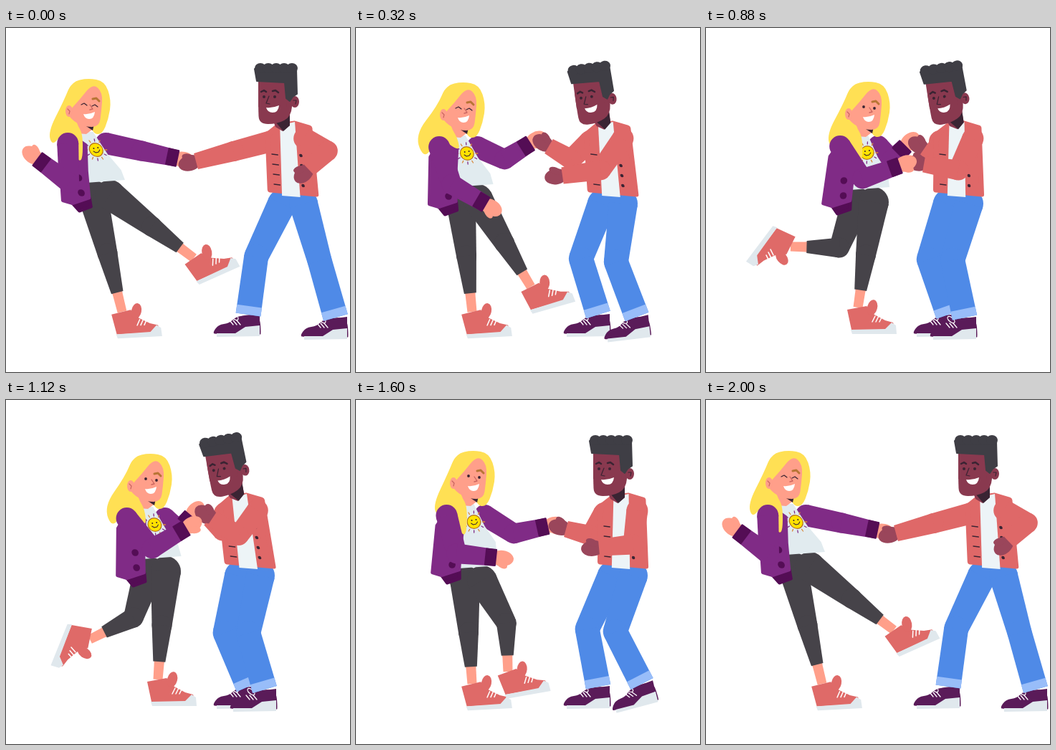
An HTML page with a canvas that plays this animation: 480x480 px, repeating every 2080 ms.

```html
<!DOCTYPE html>
<html lang="en">
<head>
<meta charset="utf-8">
<title>Dancing couple</title>
<style>
html, body { margin: 0; width: 100%; height: 100%; overflow: hidden; background: #fff; }
canvas { display: block; width: 480px; height: 480px; }
</style>
</head>
<body>
<canvas id="stage" width="480" height="480"></canvas>
<script>
const g = document.getElementById('stage').getContext('2d');
const LOOP = 2080, STEP = 80;
const BEATS = [0, 320, 560, 880, 1120, 1600, 1880];
const C = {
  blond: '#ffe054', peach: '#ff9f8a', purple: '#802b86', plum: '#540d55', pants: '#464349',
  shirt: '#e1ebef', boot: '#df6a68', sole: '#e0e8ed', brown: '#89394f', palm: '#9a465b', black: '#3f3e45',
  coral: '#df6868', jeans: '#4f8ae7', cuff: '#98bdf9', shoe: '#5a1b59', ink: '#3a2433'
};

// One key per beat; elbows, knees, torsos and hair follow from these.
const path = (...keys) => keys;
const planted = [162, 396, -3], forward = [212, 390, 0], closeBy = [361, 405, 0];
const move = {
  // head, then waist
  girl: path([112, 113, 130, 214], [146, 118, 155, 220], [190, 119, 190, 224],
    [223, 117, 219, 224], [198, 117, 208, 220], [160, 113, 161, 233]),
  swish: path([.1], [.9], [1], [.2], [.7], [0]),
  girlHand: path([44, 183], [181, 246], [243, 204], [270, 192], [251, 179], [195, 220]),
  clasp: path([252, 184], [256, 163], [273, 160], [291, 167], [271, 164], [280, 178]),
  bootA: path(planted, planted, [150, 385, 20], [118, 305, 127], [117, 334, 112], planted),
  bootB: path([262, 321, -24], [244, 361, -16], forward, forward, forward, [212, 379, -10]),
  // head, head angle, waist
  boy: path([372, 0, 400], [327, -8, 358], [318, -4, 342], [331, -9, 352], [303, -10, 340], [351, 0, 372]),
  boyHand: path([422, 197], [288, 206], [276, 203], [304, 190], [288, 165], [339, 206]),
  shoeB: path([460, 405, 0], [392, 404, -6], closeBy, closeBy, closeBy, [399, 397, -14])
};
const shoeA = [338, 401, 0];

let now = 0;

// Smooth curve through the keys that never overshoots them.
function at(keys) {
  let i = 0;
  while (i < 5 && now >= BEATS[i + 1]) i++;
  const span = BEATS[i + 1] - BEATS[i];
  const u = Math.min(1, (now - BEATS[i]) / span), v = 1 - u;
  return keys[0].map((_, n) => {
    const val = k => keys[k % 6][n];
    const slope = k => {
      if (k % 6 === 0 || (val(k + 1) - val(k)) * (val(k) - val(k - 1)) <= 0) return 0;
      return (val(k + 1) - val(k - 1)) / (BEATS[k + 1] - BEATS[k - 1]) * span;
    };
    return v * v * (1 + 2 * u) * val(i) + u * u * (3 - 2 * u) * val(i + 1)
      + u * v * v * slope(i) - u * u * v * slope(i + 1);
  });
}

function poly(color, p, round = 0) {
  g.beginPath();
  for (let i = 0; i < p.length; i += 2) g.lineTo(p[i], p[i + 1]);
  g.closePath();
  g.fillStyle = g.strokeStyle = color;
  g.fill();
  if (round) { g.lineWidth = round; g.stroke(); }
}

function blob(color, p) {
  const n = p.length;
  g.beginPath();
  for (let i = 0; i <= n; i += 2) {
    const x = p[i % n], y = p[(i + 1) % n], mx = (x + p[(i + 2) % n]) / 2, my = (y + p[(i + 3) % n]) / 2;
    i ? g.quadraticCurveTo(x, y, mx, my) : g.moveTo(mx, my);
  }
  g.fillStyle = color;
  g.fill();
}

function oval(color, x, y, rx, ry = rx, turn = 0) {
  g.beginPath();
  g.ellipse(x, y, rx, ry, turn, 0, 7);
  g.fillStyle = color;
  g.fill();
}

function line(color, width, ...p) {
  g.beginPath();
  for (let i = 0; i < p.length; i += 2) g.lineTo(p[i], p[i + 1]);
  g.strokeStyle = color;
  g.lineWidth = width;
  g.stroke();
}

function local(x, y, deg, draw, lean = 0) {
  g.save();
  g.translate(x, y);
  g.rotate(deg * Math.PI / 180);
  g.transform(1, 0, lean, 1, 0, 0);
  draw();
  g.restore();
}

// Tapered limb with round joints and a square end.
function limb(color, p, w) {
  for (let i = 0; i + 1 < w.length; i++) {
    const [x, y, X, Y] = p.slice(2 * i, 2 * i + 4), d = Math.hypot(X - x, Y - y) || 1;
    const nx = (y - Y) / d / 2, ny = (X - x) / d / 2, a = w[i], b = w[i + 1];
    oval(color, x, y, a / 2);
    poly(color, [x + nx * a, y + ny * a, X + nx * b, Y + ny * b, X - nx * b, Y - ny * b, x - nx * a, y - ny * a]);
  }
}

// Two equal bones between fixed ends; they stretch when the ends are too far apart.
function bend([x, y], [X, Y], bone, side, most = 99) {
  const dx = X - x, dy = Y - y, d = Math.hypot(dx, dy) || 1;
  const out = side * Math.min(most, Math.sqrt(Math.max(0, bone * bone - d * d / 4))) / d;
  return [x, y, (x + X) / 2 - dy * out, (y + Y) / 2 + dx * out, X, Y];
}

// Draws in a frame whose x axis runs along the last segment, from its end.
function tip(p, draw) {
  const [x, y, X, Y] = p.slice(2, 6);
  local(X, Y, Math.atan2(Y - y, X - x) * 180 / Math.PI, draw);
}

function arm(p, sleeve, skin, cuff) {
  tip(p, () => {
    oval(skin, 9, 0, 16, 11);
    oval(skin, 9, 8, 9, 5, .5);
  });
  limb(sleeve, p, [30, 28, 23]);
  if (cuff) tip(p, () => poly(cuff, [-14, -11, 0, -11, 0, 11, -14, 11], 2));
}

function girlArm(shoulder, hand, bone, most) {
  const side = Math.max(-1, Math.min(1, (hand[0] - shoulder[0]) / 40));
  arm(bend(shoulder, hand, bone, side, most), C.purple, C.peach, C.plum);
}

function boot() {
  poly(C.boot, [-15, 3, 12, -2, 23, 10, 38, 18, 49, 21, 52, 31, -9, 31]);
  oval(C.boot, 20, 0, 7, 11, .25);
  poly(C.sole, [-10, 31, 38, 30, 47, 21, 53, 25, 54, 37, -8, 37]);
  for (const x of [20, 25, 30]) line('#fff', 1.5, x, 20, x + 4, 12);
}

function shoe() {
  blob(C.shoe, [-17, 1, 16, -2, 18, 27, 16, 26, -44, 26, -50, 25, -42, 13, -26, 11]);
  poly(C.shoe, [-16, 2, 16, -2, 16, 25, -20, 25]);
  poly(C.sole, [-44, 25, -18, 25, -4, 16, 16, 14, 16, 29, -44, 30]);
  for (const x of [-26, -21, -16]) line('#fff', 1.3, x, 7, x + 5, 13);
  g.beginPath();
  g.ellipse(-19, 2, 6, 3, .7, 0, 7);
  g.stroke();
}

function girlLeg(hip, [x, y, deg]) {
  const p = bend(hip, [x, y], 68, -1), [kx, ky] = p.slice(2);
  const hem = [kx + (x - kx) * .67, ky + (y - ky) * .67];
  limb(C.peach, [...hem, x, y], [14, 13]);
  local(x, y, deg, boot);
  limb(C.pants, [...hip, kx, ky, ...hem], [42, 28, 17]);
}

function boyLeg(hip, [x, y, deg]) {
  const p = bend(hip, [x, y - 1], 82, 1);
  local(x, y, deg, shoe);
  limb(C.jeans, p, [40, 34, 35]);
  tip(p, () => poly(C.cuff, [-12, -17.5, 0, -17.5, 0, 17.5, -12, 17.5]));
}

function smile(x, y, w) {
  g.beginPath();
  g.moveTo(x - w, y - 2);
  g.quadraticCurveTo(x, y - 1, x + w, y - 5);
  g.quadraticCurveTo(x + w - 1, y + 5, x, y + 5);
  g.quadraticCurveTo(x - w + 2, y + 5, x - w, y - 2);
  g.fillStyle = '#fff';
  g.fill();
}

function sun() {
  for (let i = 0; i < 12; i++) {
    const c = Math.cos(i * Math.PI / 6), s = Math.sin(i * Math.PI / 6);
    line(i % 2 ? C.purple : '#d88a3c', 1.3, c * 12, s * 12, c * 15, s * 15);
  }
  oval('#b5701d', 0, 0, 10);
  oval('#ffe200', 0, 0, 8.8);
  oval(C.ink, -3, -2, 1);
  oval(C.ink, 3, -3, 1);
  line(C.ink, 1, -4, 2, -1, 4, 3, 3, 5, 0);
}

function girlHead() {
  const [s] = at(move.swish), shut = now < 440 || now > 1720;
  blob(C.blond, [-30, -14, -20, -38, 2, -43, 26, -39, 35, -12, 31, 14, 22, 36, 8, 34, 0, 0]);
  poly(C.peach, [-15, 10, 8, 18, 8, 29, 0, 35, -13, 34]);
  poly(C.ink, [-6, 20, 11, 21, 9, 30]);
  blob(C.blond, [6, -40, -20, -39, -32, -10, -52 - 14 * s, 32, -47 - 3 * s, 50 + 19 * s, -32, 32,
    -7 + 7 * s, 88 - 36 * s, -4, 36, -14, 20, -18, -6]);
  blob(C.peach, [-27, 6, -10, -12, 9, -36, 23, -23, 21, 4, 18, 25, -2, 25, -18, 17]);
  oval(C.peach, -24, 3, 5, 8);
  line('#c96561', 1.2, -26, 0, -23, 3, -24, 7);
  for (const [x, y] of [[-3, -7], [12, -5]]) {
    if (shut) line(C.ink, 1.2, x - 4, y + 1, x, y - 1, x + 4, y + 2);
    else oval(C.ink, x, y, 1.9);
  }
  line('#b87535', 3, 9, -14, 14, -15, 18, -11);
  line('#c96561', 1.3, 5, -6, 9, 0, 5, 1);
  smile(4, 9, 8);
}

// Torso points hang below the head, sheared towards the waist.
function girlBody(waist) {
  poly(C.shirt, [-16, 32, 4, 32, 19, 63, 34, 85, 37, waist - 2, -18, waist + 2]);
  local(4, 57, 0, sun);
  poly(C.plum, [-42, 131, -17, 124, -17, 136, -34, 142], 5);
  poly(C.purple, [-29, 34, -48, 62, -55, 128, -42, 132, -17, 124, -14, 86, -9, 50], 4);
  for (const y of [117, 96]) oval(C.plum, -27, y, 4.8);
}

function drawGirl(x, y, wx, wy, lean) {
  girlLeg([wx - 9, wy + 19], at(move.bootA));
  girlLeg([wx + 15, wy + 19], at(move.bootB));
  local(x, y, 0, () => girlBody(wy - y), lean);
  local(x, y, 0, girlHead);
  girlArm([x - 34 + 48 * lean, y + 48], at(move.girlHand), 55);
}

function boyHead() {
  poly(C.brown, [-2, 18, 24, 10, 24, 32, 14, 40, 4, 34]);
  poly(C.ink, [4, 27, 24, 16, 24, 32, 15, 40]);
  blob(C.brown, [-20, -34, 20, -34, 28, -8, 26, 20, 6, 30, -19, 30, -20, 8]);
  poly(C.brown, [-20, -31, 18, -31, 20, 6, -20, 6]);
  oval(C.brown, 31, -1, 6, 8);
  line(C.ink, 1.2, 29, -3, 33, -3, 32, 2);
  poly(C.black, [-22, -30, -25, -47, 0, -50, 33, -47, 34, -12, 28, -8, 24, -2, 19, -6, 17, -28], 2);
  for (let x = -17; x < 30; x += 11) oval(C.black, x, -48, 8, 7);
  line(C.ink, 2.5, -16, -15, -12, -17, -9, -15);
  line(C.ink, 2.5, 0, -16, 4, -17, 8, -14);
  oval(C.ink, -12, -8, 2);
  oval(C.ink, 3, -8, 2);
  line(C.ink, 1.2, -5, -9, -9, 1, -4, 2);
  smile(0, 9, 9);
}

function boyBody() {
  poly(C.coral, [-17, 45, 2, 32, 25, 29, 44, 35, 32, 128, -31, 122], 7);
  poly('#edf4f7', [3, 32, 25, 27, 9, 132, -16, 130]);
  for (let y = 72; y < 120; y += 14) {
    const slant = (y - 38) * .15;
    line(C.ink, 1.5, -12 - slant, y, -4 - slant, y + 1);
    oval(C.ink, 28 - slant, y + 2, 2.2);
  }
}

function drawBoy([x, tilt, wx], clasp) {
  const y = 104, lean = (wx - x) / 125;
  const arms = (sx, sy, hand, bone, most) =>
    arm(bend([x + sx + sy * lean, y + sy], hand, bone, -1, most), C.coral, C.palm);
  arms(-14, 54, clasp, 45, 22);
  boyLeg([wx - 15, 245], shoeA);
  boyLeg([wx + 15, 245], at(move.shoeB));
  local(x, y, 0, boyBody, lean);
  local(x, y, tilt, boyHead);
  arms(33, 50, at(move.boyHand), 54, 30);
}

function frame() {
  now = Math.floor(performance.now() % LOOP / STEP) * STEP;
  g.fillStyle = '#fff';
  g.fillRect(0, 0, 480, 480);
  g.lineCap = g.lineJoin = 'round';
  const [x, y, wx, wy] = at(move.girl), [cx, cy] = at(move.clasp), lean = (wx - x) / 105;
  girlArm([x + 19 + 48 * lean, y + 48], [cx - 13, cy - 2], 48, 20);
  drawBoy(at(move.boy), [cx + 13, cy + 2]);
  drawGirl(x, y, wx, wy, lean);
  requestAnimationFrame(frame);
}
frame();
</script>
</body>
</html>
```
